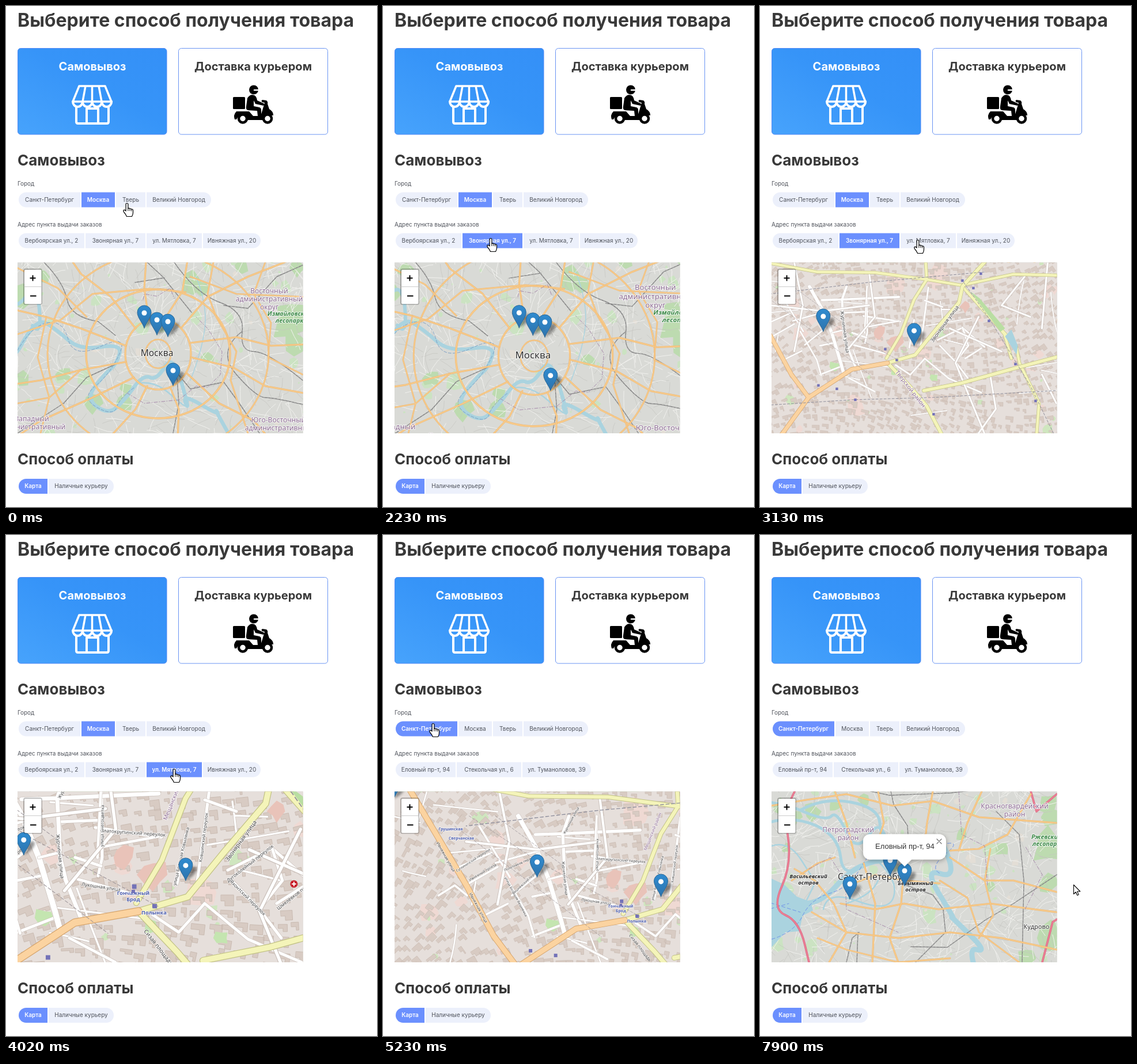
Recreate the animation shown at these times as an HTML page. Size 644 by 870 pixels, loop 8000 ms.

```html
<!DOCTYPE html>
<html lang="ru">
<head>
<meta charset="utf-8">
<title>Способ получения товара</title>
<style>
html,body{margin:0;width:100%;height:100%;overflow:hidden;background:#fff}
svg{display:block;width:644px;height:870px;font-family:Inter,sans-serif}
.head{font-weight:700;fill:#393939}
.small{font-size:10px;fill:#50545c}
.map text{font-family:"Noto Sans","Open Sans",sans-serif;text-anchor:middle;paint-order:stroke;stroke:#fff;stroke-opacity:.75;stroke-width:2px;stroke-linejoin:round}
.flat path{vector-effect:non-scaling-stroke}
path{stroke-linecap:round;stroke-linejoin:round}
</style>
</head>
<body>
<svg id="stage" viewBox="0 0 644 870" xmlns="http://www.w3.org/2000/svg"></svg>
<script>
const $ = id => document.getElementById(id);
let seed = 7;
const rnd = (a = 0, b = 1) => {
  seed = (seed * 16807) % 2147483647;
  return a + (b - a) * seed / 2147483647;
};
const n1 = v => v.toFixed(1);
const line = (d, color, w, more = '') => `<path d="${d}" fill="none" stroke="${color}" stroke-width="${w}" ${more}/>`;
const area = (d, color, more = '') => `<path d="${d}" fill="${color}" ${more}/>`;
const road = (d, color, edge, w) => line(d, edge, w + 1.4) + line(d, color, w);
const text = (x, y, s, size, more = '') => `<text x="${x}" y="${y}" font-size="${size}" ${more}>${s}</text>`;
const group = (inner, more = '') => `<g ${more}>${inner}</g>`;

// ---------- generated map texture ----------
const BOX = [-240, 780, 290, 900];

function mesh(count, min, max) {
  let d = '';
  for (let i = 0; i < count; i++) {
    let x = rnd(BOX[0], BOX[1]), y = rnd(BOX[2], BOX[3]), a = rnd(0, 6.28);
    d += `M${n1(x)} ${n1(y)}`;
    for (let k = 0; k < 3; k++) {
      const l = rnd(min, max);
      a += rnd(-.35, .35);
      x += Math.cos(a) * l;
      y += Math.sin(a) * l;
      d += `L${n1(x)} ${n1(y)}`;
    }
  }
  return d;
}

function blob(x, y, r) {
  let d = '';
  for (let i = 0; i < 8; i++) {
    const q = r * rnd(.55, 1.15), a = i * Math.PI / 4;
    d += `${i ? 'L' : 'M'}${n1(x + q * Math.cos(a))} ${n1(y + q * Math.sin(a))}`;
  }
  return d + 'Z';
}

function blobs(count, min, max, [x0, x1, y0, y1] = BOX) {
  let d = '';
  for (let i = 0; i < count; i++) d += blob(rnd(x0, x1), rnd(y0, y1), min + (max - min) * rnd() ** 3);
  return d;
}

const ground = parks =>
  '<rect x="-900" y="-500" width="2400" height="2200" fill="#d9dad6"/>' +
  area(blobs(230, 2, 17), '#cbe3c2') + area(blobs(70, 3, 12), '#e3ded6') +
  area(parks.map(p => blob(...p)).join(''), '#bddbb0') +
  line(mesh(750, 6, 16), '#c4c5c1', .7) + line(mesh(1150, 6, 18), '#f1f1ee', 1);

const water = (d, w) => line(d, '#aad3df', w);
const main = (d, w = 1.7) => road(d, '#f9cd8c', '#edb877', w);
const rail = d => line(d, '#7d7d7d', 1.4) + line(d, '#c9c9c9', .5, 'stroke-dasharray="3 3"');

// ---------- labels ----------
const PURPLE = 'fill="#8c6a93"', FOREST = 'fill="#3d8a4a" font-style="italic" font-weight="600"';
const label = (x, y, s, size = 12, more = PURPLE) =>
  s.split('|').map((row, i) => text(x, y + i * size * 1.18, row, size, more)).join('');
const street = (x, y, a, s, size = 8.4, more = 'fill="#444"') =>
  text(x, y, s, size, `${more} transform="rotate(${a} ${x} ${y})" dy="${size * .35}"`);
const METRO = 'fill="#4d5fb0" font-weight="700"';

// ---------- city overviews ----------
function moscow() {
  const ring = (rx, ry) => `M${264 - rx} 604a${rx} ${ry} 0 1 0 ${2 * rx} 0a${rx} ${ry} 0 1 0 ${-2 * rx} 0Z`;
  return ground([[495, 545, 38], [500, 585, 26], [325, 480, 24], [338, 492, 14], [150, 690, 18], [205, 690, 17], [30, 505, 22], [60, 470, 16], [30, 650, 16], [100, 640, 14], [505, 455, 15], [410, 450, 14], [350, 610, 13], [210, 665, 12]]) +
    water('M-90 590Q0 640 26 590T70 551 108 580 165 592 197 604 182 630 155 660 158 696 192 697 222 662 250 645 276 626 305 655 312 690 338 692 366 704 386 742 430 800', 6.5) +
    water('M-60 520Q10 535 32 508T58 528 46 555', 6) + water('M230 655Q258 650 285 674T314 696', 2.5) + water('M330 470Q350 520 345 560T320 650', 1.5) +
    line('M20 598Q45 555 72 550T108 579 165 591 197 604 155 660 158 697 192 697 222 663', '#7d9fc4', 1, 'stroke-dasharray="5 3"') +
    rail('M66 445Q100 480 106 510T160 548L190 572') + rail('M245 445L272 470 322 532M224 480L275 472') +
    rail('M292 445Q330 500 372 515T410 565 430 600 515 650') + rail('M291 630L320 665 378 653 405 690 440 742') +
    rail('M20 742L100 690 140 645 190 622') + rail('M378 520L420 525 470 470 515 450') + rail('M296 632L300 690 290 742') + rail('M410 565Q365 600 400 640T450 680 515 692') +
    main(ring(57, 62), 1.8) + main(ring(125, 112), 2) + main(ring(22, 25), 1.1) + main(ring(192, 176), 1.4) +
    main('M225 560L182 505 130 465 85 400M248 545L240 490 246 400M275 544L306 496 322 400M305 558L350 505 420 470 560 415') +
    main('M320 585L400 575 460 590 560 586M321 610L395 628 450 660 560 680M314 638L370 690 430 720 500 800M285 662L300 700 296 800') +
    main('M245 660L225 700 170 760M222 645L150 680 60 720-30 780M208 618L130 632 60 650-40 665M208 590L130 560 70 540-40 515') +
    main('M205 495L250 491 312 497M20 455L90 490 140 540M360 445L350 500 365 540 400 600 390 650 420 742M20 570L95 545 150 500 205 495', 1.4) +
    main('M450 445L430 500 460 550 455 610 515 640M20 690L75 680 130 632M60 742L75 680 55 610 70 540M320 470L400 500 515 505', 1.2) +
    line('M238 510L240 500 262 504 285 490 292 508M210 672L240 690 300 684 330 660 350 662 372 640 375 600 350 560 330 540', '#a88cac', 1, 'stroke-dasharray="6 3 1 3"') +
    label(457, 499, 'Восточный|административный|округ') + label(492, 538, 'Измайловский|лесопарк', 10.5, FOREST) +
    label(262, 608, 'Москва', 15.5, 'fill="#2c2c2c"') +
    label(45, 721, 'Западный|административный') + label(473, 723, 'Юго-Восточный|административный');
}

function petersburg() {
  return ground([[500, 540, 32], [510, 490, 22], [500, 465, 18], [505, 700, 30], [90, 480, 18], [60, 490, 15], [35, 470, 16], [130, 470, 12], [45, 545, 10], [420, 545, 14], [350, 520, 12], [180, 460, 13], [400, 610, 10], [500, 605, 18], [460, 735, 18]]) +
    area('M-250 560L10 592 42 607 64 628 88 637 92 652 74 661 68 688 44 690 20 716-250 800Z', '#aad3df') +
    water('M75 640Q105 640 130 612T176 575 206 566 226 545 270 548 304 539 324 552 313 588 312 625 334 665 362 692 376 720 388 790', 9) +
    water('M-40 465Q25 458 70 478T124 488 150 516 190 520 222 546M20 498Q60 488 98 505T140 560 178 574M70 478Q110 455 158 464T208 500 222 545', 5) +
    water('M20 540Q50 530 72 565T96 600 80 636M206 568Q240 600 232 628T170 636 110 650M205 600Q195 625 150 640', 2.5) +
    line('M20 702Q60 690 74 661T122 622 176 576 224 547 304 540 324 552 313 588', '#6f93e8', 1, 'stroke-dasharray="6 4"') +
    line('M-20 660L50 640M-10 630L70 655', '#6f93e8', 1, 'stroke-dasharray="6 4"') +
    rail('M224 430L232 468 256 505 258 542') + rail('M166 800L170 690M150 742L160 700 172 690') + rail('M248 606L300 625 318 650 322 690 270 742') +
    rail('M262 715L325 716 392 668 440 640 560 560') + rail('M410 480L450 520 458 600 455 742') + rail('M192 445L225 452 330 448 400 440') +
    road('M70 430Q40 470 48 520T38 610 44 660 78 712 96 790M560 640L508 672 490 742 470 800M515 450L480 480 470 445', '#ec7f95', '#d96581', 2.2) +
    main('M20 470L80 460 150 450 230 470 300 462 380 490 515 500M130 445L150 500 165 560M205 445L215 500 200 545') +
    main('M150 610L200 590 250 600 312 605M140 640L200 650 250 640 310 650 400 640 515 655M180 570L200 640 195 742') +
    main('M250 575L245 640 225 700 240 742M120 742L150 690 128 640 95 600 60 580M90 655L150 690 240 700 330 690 420 700 515 720') +
    main('M330 548L380 545 430 520 470 450M330 560L390 600 440 600 515 620M300 445L290 500 285 545M385 445L360 500 345 548') +
    main('M312 600L360 630 380 690 450 742M400 545L390 600 405 660 380 700M55 600L100 570 130 560M100 700L150 720 240 742 330 735', 1.4) +
    line('M345 445L350 520 390 540 395 610M85 580L122 560 148 600 150 650 240 690M460 650L490 590 460 540', '#a88cac', 1, 'stroke-dasharray="6 3 1 3"') +
    label(153, 516, 'Петроградский|район') + label(442, 475, 'Красногвардейский|район') +
    label(84, 596, 'Васильевский|остров', 9.5, 'fill="#222" font-style="italic" font-weight="600"') +
    label(270, 608, 'Безымянный|остров', 9.5, 'fill="#222" font-style="italic" font-weight="600"') +
    label(497, 528, 'Ржевский|лесопарк', 10.5, FOREST) + label(480, 684, 'Кудрово', 11, 'fill="#333"') +
    text(135, 599, 'Санкт-Петербу', 15.5, 'fill="#2c2c2c" style="text-anchor:start"');
}

function tver() {
  return ground([[120, 500, 35], [420, 690, 40], [70, 680, 30], [470, 490, 28], [200, 470, 20]]) +
    water('M-250 590Q40 520 150 565T300 575 400 540 780 580', 12) + water('M290 445Q310 510 286 572', 4) +
    rail('M20 742L180 680 300 665 515 700M180 680L120 742') +
    main('M-100 650L120 610 270 600 400 585 650 640M270 420L262 560 275 680 330 800M130 440L190 560 185 650M400 430L380 560 410 742') +
    main('M20 510L150 530 270 525 400 490 515 470M60 742L130 660 185 650 275 680 400 660 515 610', 1.4) +
    label(267, 593, 'Тверь', 15.5, 'fill="#2c2c2c"');
}

// ---------- central Moscow, close up ----------
function blocks() {
  let d = '';
  for (let x = -650; x < 1350; x += 25) for (let y = 50; y < 1150; y += 24) {
    const a = .5 * Math.sin(x / 210) + .4 * Math.cos(y / 160) - .2;
    const w = rnd(8, 24), h = rnd(7, 20), px = x + rnd(-5, 5), py = y + rnd(-5, 5);
    if (rnd() < .12) continue;
    const c = Math.cos(a), s = Math.sin(a), notch = rnd(.3, .75);
    d += `M${n1(px)} ${n1(py)}l${n1(w * c)} ${n1(w * s)}l${n1(-h * s)} ${n1(h * c)}l${n1(-w * notch * c)} ${n1(-w * notch * s)}l${n1(h * .45 * s)} ${n1(-h * .45 * c)}l${n1(-w * (1 - notch) * c)} ${n1(-w * (1 - notch) * s)}z`;
  }
  return d;
}

function lanes() {
  let d = '';
  for (let i = 0; i < 90; i++) {
    const x = rnd(-600, 1300), y = rnd(60, 1130), l = rnd(50, 160), a = rnd() < .5 ? rnd(-.2, .3) : rnd(1.2, 1.9);
    d += `M${n1(x)} ${n1(y)}q${n1(l * .5 * Math.cos(a) + rnd(-8, 8))} ${n1(l * .5 * Math.sin(a))} ${n1(l * Math.cos(a))} ${n1(l * Math.sin(a))}`;
  }
  return d;
}

const WIDE = 'transform="translate(-166 -452) scale(1.783)"';
const WEST = 'transform="translate(-211.6 4.8) scale(.926)"';

function closeUp() {
  const all = [-650, 1350, 50, 1150];
  const white = (d, w) => road(d, '#fff', '#cbc1bb', w);
  const yellow = (d, w) => road(d, '#f4f4b9', '#c2c286', w);
  const orange = (d, w) => road(d, '#fbd3a0', '#d6a56d', w);
  const stations = [[218, 596], [238, 615], [102, 659], [134, 665], [166, 684], [302, 709], [352, 477], [384, 465], [371, 490], [398, 547], [444, 622], [479, 686]];
  const squares = stations.map(([x, y]) => `<rect x="${x - 2.2}" y="${y - 2.2}" width="4.4" height="4.4" fill="#7372b8"/>`).join('');
  return '<rect x="-3000" y="-2500" width="6500" height="6000" fill="#e6dfdb"/>' +
    area(blobs(90, 14, 45, all), '#efd9d3') + area(blobs(130, 5, 24, all), '#cfe6bf') +
    area(blocks(), '#d8cbc3', 'stroke="#c4b5ab" stroke-width=".8"') +
    area(blob(255, 590, 28) + blob(205, 560, 22) + blob(470, 480, 18), '#e9c3b9') + area(blob(68, 665, 20) + blob(250, 680, 12) + blob(375, 700, 14), '#c4e5b0') +
    white(lanes(), 3.2) +
    white('M155 508L270 525M125 598L222 624M95 498L168 495M166 420L167 560 160 592M356 420L343 520 332 602M312 520L297 606M385 582L462 544 530 604M392 600L440 650 478 700', 5) +
    white('M345 640L420 702 520 745M470 640L520 608M440 650L480 600 462 544M120 560L165 575M255 660L300 690 345 640M20 600L60 592M20 690L84 665M110 700L190 742M400 480L345 460', 5) +
    white('M-12 417L27 486 57 560 85 653 95 690', 10) + white('M27 459L89 457 103 417M89 457L265 449M89 457L94 560 104 600 132 670', 7) +
    group(white('M160 560L268 530M60 575L150 535M95 610L165 570M185 595L240 690 255 742M120 470L195 595M200 640L268 585M20 640L60 615 90 640M130 690L190 660M290 600L330 590M400 600L408 445M408 580L515 560', 5), WEST) +
    group(white('M60 445L75 520 60 600M380 540L340 620 390 742M330 560L420 600M20 520L110 530 190 520M190 463L200 540 150 600M460 470L420 520 470 540M500 445L490 560M400 640L410 700 380 742M490 640L515 690', 3), WIDE) +
    group(
      yellow('M-90 420L20 447 100 462 200 463 290 475 350 485 390 530 445 590 451 620 485 690 478 780 470 900M372 506L425 570 437 612M288 440L290 475 268 510 245 570 220 612M350 485L440 466 600 470M342 739', 4.5) +
      yellow('M222 620L270 606 305 563 346 515 352 487 395 440M224 622L260 660 290 695 315 742 330 800M285 668L350 655 440 630 515 610 650 590', 5.5) +
      orange('M-60 440L20 575 55 640 85 680 160 631 222 620M85 680L40 742-10 800', 6.5) +
      area('M426 574L437 562 448 590 446 606Z', '#aad3df') + area('M366 496L382 508 426 560 418 566Z', '#b9dea2') +
      line('M20 693L160 684 300 680 515 668M390 462L190 480 20 500M510 742L470 660 400 545 352 477', '#8f8f9c', 1, 'stroke-dasharray="4 3"') + squares, WIDE) +
    group(line('M95 445L270 560 515 692M60 470L240 605 420 742M160 445L330 570', '#9b9398', 1.1, 'stroke-dasharray="6 4"'), WEST) +
    group(group(
      street(148, 566, 82, 'Журчинная улица') + street(321, 552, -54, 'Звонярная улица', 9) +
      street(262, 665, 52, 'Тверской район', 10, PURPLE), WIDE), 'id="far"') +
    group(
      street(94, 558, 84, 'Журчинная улица', 8.8) + street(167, 505, -89, 'улица Снегоцветка', 7.8) +
      street(221, 517, 4, 'Златокрупинский переулок') + street(304, 558, -77, 'улица Большая Ковылянка', 7.8) +
      street(343, 525, -83, 'Ковшинский переулок', 7.8) + street(408, 531, -54, 'Звонярная улица', 10) +
      street(424, 570, -38, 'Дугоколейный переулок') + street(420, 630, 45, 'Яхонтский переулок') +
      street(506, 622, -38, 'Шмелёвков переулок') + street(165, 611, 8, 'Лукошная улица') +
      street(265, 716, 52, 'Сизая площадь', 10) + street(293, 452, -68, 'Мещанский район', 10, PURPLE) +
      label(221, 625, 'Гончажный|Брод', 9.2, METRO) + label(257, 659, 'Полынка', 9.2, METRO) +
      '<circle cx="500" cy="606" r="6.5" fill="#c8202c"/>' + line('M497 606h6M500 603v6', '#fff', 2) +
      '<path d="M218 616h6v6h-6zM254 641h6v6h-6z" fill="#7372b8"/>' +
      group(
        street(118, 670, 61, 'Ивняжная улица', 10) + street(38, 545, 60, 'Ивняжная улица', 10) +
        street(105, 553, -33, 'Суглиничский переулок') + street(128, 583, -31, 'Ивняжный проезд') +
        street(210, 643, 62, 'улица Большая Вешняжка') + street(222, 560, -24, 'Полотняков переулок') +
        street(236, 604, -43, 'Вешняжский переулок') + street(345, 456, -62, 'Журчинная улица') +
        label(50, 480, 'Грушинская', 9.2, METRO) + label(76, 503, 'Сверчанская', 9.2, METRO), WEST), 'id="near"');
}

// ---------- page furniture ----------
const shop = group(
  line('M127 139h45l11 27h-67zM138 139l-5 27M149.500 139v27M161 139l5 27', '#fff', 3.5) +
  line('M116 166a8.400 9 0 0 0 16.800 0a8.400 9 0 0 0 16.800 0a8.400 9 0 0 0 16.800 0a8.400 9 0 0 0 16.800 0', '#fff', 4) +
  line('M122 176v25q0 3 3 3h50q3 0 3-3v-25M140 203v-25h20v25', '#fff', 4));

const courier = group(
  '<rect x="394" y="158" width="21" height="21" rx="1.500"/><circle cx="430" cy="145.500" r="8"/>' +
  line('M431 146h7', '#fff', 2.500) +
  area('M419 160q5-8 12-5 4 2 5 9l11 5q3 2 0 4l-14-3-3-6v10l10 2q3 1 3 5v10h-6l-1-9-16-1q-4-1-3-7z', '#000') +
  area('M396 183h26l7 8h13q4-13 7-23l-4-1q-3-2 0-4l7 1q3 2 2 6l3 9q7 4 7 11h-9q-7 2-8 8h-28q-3-8-9-8-7 0-10 7h-3q-3-8 3-14z', '#000') +
  [411, 454].map(x => `<circle cx="${x}" cy="195.500" r="7" fill="#fff" stroke="#000" stroke-width="4.500"/>`).join(''));

const control = '<rect x="30" y="456" width="33" height="63" rx="4" fill="#000" opacity=".25"/><rect x="32" y="458" width="29.500" height="59.500" rx="2" fill="#fff"/>' +
  line('M32 487.500h29.500', '#ccc', 1) + line('M41.500 472.500h10M46.500 467.500v10M42 503.500h10.500', '#000', 2, 'style="stroke-linecap:butt"');

function popup(id, x, y, w, tip, s) {
  return group(`<g filter="url(#soft)"><rect x="${x}" y="${y}" width="${w}" height="44" rx="12" fill="#fff"/><path d="M${tip - 13} ${y + 43}h26l-13 13z" fill="#fff"/></g>` +
    text(x + 21, y + 25.5, s, 13, 'fill="#333" font-family="Liberation Sans,sans-serif"') +
    line(`M${x + w - 16} ${y + 8.5}l8 8m0-8l-8 8`, '#757575', 1.3), `id="${id}" opacity="0"`);
}

$('stage').innerHTML = `<defs>
<clipPath id="frame"><rect x="20" y="445.500" width="495.500" height="296.500"/></clipPath>
<linearGradient id="card" x1="0" y1="1" x2="1" y2="0"><stop stop-color="#47a3fc"/><stop offset=".55" stop-color="#3694f8"/><stop offset="1" stop-color="#3490f7"/></linearGradient>
<linearGradient id="blue" x1="0" y1="0" x2="0" y2="1"><stop stop-color="#2f8bd0"/><stop offset="1" stop-color="#2e74ad"/></linearGradient>
<filter id="soft" x="-20%" y="-30%" width="140%" height="180%"><feDropShadow dx="0" dy="2" stdDeviation="4" flood-opacity=".35"/></filter>
<filter id="blur" x="-50%" y="-50%" width="200%" height="200%"><feGaussianBlur stdDeviation="2"/></filter>
<g id="pin"><path d="M0 0L9-22Q20-27 19-18Q16-8 0 0" opacity=".4" filter="url(#blur)"/>
<path d="M0 0C-3-9-12-18-12-27A12 12 0 0 1 12-27C12-18 3-9 0 0Z" fill="url(#blue)" stroke="#2a6795"/><circle cy="-26" r="4.500" fill="#fff"/></g></defs>
<rect width="644" height="870" fill="#fff"/>` +
  group(text(20, 36, 'Выберите способ получения товара', 32) + text(20, 277, 'Самовывоз', 26) + text(20, 796, 'Способ оплаты', 26), 'class="head"') +
  '<rect x="20.500" y="73.500" width="258.500" height="149.500" rx="5" fill="url(#card)" stroke="#5089f5"/><rect x="299.500" y="73.500" width="259" height="149.500" rx="5" fill="#fff" stroke="#6a94f3"/>' +
  text(150, 112, 'Самовывоз', 20, 'text-anchor="middle" font-weight="700" fill="#fff"') +
  text(429, 112, 'Доставка курьером', 20, 'text-anchor="middle" class="head"') + shop + courier +
  text(20, 312, 'Город', 10, 'class="small"') + text(20, 383, 'Адрес пункта выдачи заказов', 10, 'class="small"') +
  '<g id="city"></g><g id="addr"></g><g id="pay"></g>' +
  group('<rect x="20" y="445" width="496" height="298" fill="#ddd"/>' +
    group(group(moscow(), 'class="flat"') + group(closeUp(), 'id="close" transform="translate(281 574) scale(.06757) translate(-312 -600)"'), 'id="m"') +
    group(tver(), 'id="t" class="flat"') + group(petersburg(), 'id="s" class="flat"'), 'class="map" clip-path="url(#frame)"') +
  group('<g id="pins"></g>' + control, 'clip-path="url(#frame)"') +
  popup('popA', 73, 542, 166, 156, 'ул. Туманоловов, 39') + popup('popB', 179, 519.5, 144, 251, 'Еловный пр-т, 94') +
  group(area('M-1.900 2.500Q-1.900.500 0 .500T1.900 2.500V9.500Q4 8.300 5 10 7 9.200 7.800 11 10.500 10.500 10.500 13V17Q10.500 20 8.500 23.500H-.500Q-2 19.500-5 16.500-7 13.500-5.500 12.300-3.800 11.300-1.900 14Z', '#fff', 'stroke="#000" stroke-width="1.200"') +
    line('M1.900 9.500v4M5 10.500v3M7.800 11.500v2.500', '#000', 1), 'id="hand"') +
  group(area('M.500.500V16.500L4.200 13 6.800 18.700 9.200 17.600 6.700 12H11.800Z', '#fff', 'stroke="#000" stroke-width="1.100"'), 'id="arrow"');

// ---------- state ----------
const CITIES = [['Санкт-Петербург', 22, 107], ['Москва', 131, 58], ['Тверь', 191, 51], ['Великий Новгород', 244, 112]];
const POINTS = {
  m: [['Вербоярская ул., 2', 22, 114], ['Звонярная ул., 7', 138, 104], ['ул. Мятловка, 7', 244, 96], ['Ивняжная ул., 20', 342, 100]],
  t: [['Липнячная ул., 5', 22, 104], ['ул. Сосноярка, 12', 128, 106]],
  s: [['Еловный пр-т, 94', 22, 104], ['Стекольчая ул., 6', 128, 112], ['ул. Туманоловов, 39', 242, 119]]
};
const PINS = {
  m: [[240, 559], [262, 571], [281, 574], [290, 659]],
  t: [[240, 585], [300, 610]],
  s: [[226, 591], [251, 609], [156, 632]]
};

function pills(id, items, y, active) {
  const key = items[0][0] + active, box = $(id);
  if (box.dataset.key === key) return;
  box.dataset.key = key;
  box.innerHTML = items.map(([s, x, w], i) => {
    const on = i === active, l = i ? 0 : 13, r = i === items.length - 1 ? 13 : 0;
    return area(`M${x + l} ${y}h${w - l - r}a${r} 13 0 0 1 ${r} 13a${r} 13 0 0 1 ${-r} 13h${-(w - l - r)}a${l} 13 0 0 1 ${-l}-13a${l} 13 0 0 1 ${l}-13z`, on ? '#6b90fe' : '#ecf0fb') +
      text(x + w / 2, y + 16, s, 10, `text-anchor="middle" fill="${on ? '#fff' : '#50545c'}" ${on ? 'font-weight="600"' : ''}`);
  }).join('');
}

// moments at which the picture advances
const TICKS = [0, 150, 300, 450, 570, 690, 810, 960, 1110, 1250, 1380, 1500, 1650, 1800, 1920, 2230, 2380, 2500, 2650, 2770, 2890, 3010, 3130, 3250, 3390, 3510, 3630, 3750, 4020, 4140, 4290, 4410, 4530, 4670, 4790, 5080, 5230, 5350, 5470, 5590, 5710, 5830, 5980, 6280, 6400, 6550, 6670, 6790, 6940, 7240, 7360, 7480, 7600, 7750, 7900];

// time, kind, then values
const CAMERA = [
  [0, 'm', 267.5, 594, 0], [150, 'm', 267.5, 594, 0], [300, 'm', 265, 590, -.35], [450, 'm', 250, 580, -1],
  [570, 't', 267.5, 594, -.9], [810, 't', 267.5, 594, 0], [1110, 't', 267.5, 594, 0], [1250, 't', 267.5, 594, -.6],
  [1380, 'm', 267.5, 594, -.7], [1500, 'm', 267.5, 594, 0], [1920, 'm', 267.5, 594, 0],
  [2230, 'm', 268.6, 591.4, .124], [2500, 'm', 272, 584, .8], [2890, 'm', 280, 576, 2.3], [3130, 'm', 281, 574.5, 3.053],
  [3390, 'm', 281, 574, 3.6], [3750, 'm', 281, 574, 4], [4020, 'm', 278, 573.6, 3.887], [4290, 'm', 266, 571.5, 3.86],
  [4530, 'm', 262.3, 571.1, 4], [4790, 'm', 262, 571, 4], [5080, 'm', 262, 571, 4], [5230, 'm', 262, 571, 3.5],
  [5350, 'm', 262, 575, 1.6], [5470, 'm', 262, 580, -.8], [5590, 's', 267.5, 594, -.9], [5710, 's', 267.5, 594, -.3], [5830, 's', 267.5, 594, 0]
];
const CURSOR = [
  [0, 'hand', 210, 342], [150, 'hand', 211, 342], [570, 'hand', 211, 342], [810, 'hand', 166, 336], [960, 'hand', 168, 336],
  [1500, 'hand', 168, 336], [1650, 'arrow', 175, 386], [1800, 'hand', 182, 395], [1920, 'hand', 187, 403], [2500, 'hand', 187, 403],
  [2650, 'hand', 196, 403], [3130, 'hand', 274, 406], [3390, 'hand', 284, 406], [3750, 'hand', 292, 406], [4140, 'hand', 292, 406],
  [4290, 'hand', 265, 398], [4410, 'arrow', 205, 384], [4530, 'arrow', 168, 377], [4670, 'arrow', 115, 352], [4790, 'hand', 84, 326],
  [5080, 'hand', 87, 327], [5350, 'hand', 87, 327], [5830, 'hand', 162, 604], [5980, 'hand', 164, 604], [6280, 'hand', 164, 604],
  [6400, 'hand', 171, 590], [6790, 'hand', 255, 590], [6940, 'hand', 257, 592], [7240, 'hand', 257, 592], [7600, 'hand', 312, 527],
  [7750, 'hand', 320, 528], [7900, 'arrow', 544, 607]
];

function at(keys, t) {
  const i = keys.findLastIndex(k => k[0] <= t), a = keys[i], b = keys[i + 1];
  if (!b || a[1] !== b[1]) return a.slice(1);
  const f = (t - a[0]) / (b[0] - a[0]);
  return [a[1], ...a.slice(2).map((v, j) => v + (b[j + 2] - v) * f)];
}
const show = (id, on) => $(id).setAttribute('display', on ? 'inline' : 'none');
const fade = (id, v) => { show(id, v > 0); $(id).setAttribute('opacity', v); };
const clamp = v => Math.max(0, Math.min(1, v));

function draw(t) {
  const city = t < 300 ? 'm' : t < 1250 ? 't' : t < 5230 ? 'm' : 's';
  const point = t >= 2230 && t < 4020 ? 1 : t >= 4020 && t < 5230 ? 2 : -1;
  pills('city', CITIES, 323.5, 'smt'.indexOf(city));
  pills('addr', POINTS[city], 394.5, point);
  pills('pay', [['Карта', 22, 50], ['Наличные курьеру', 74, 113]], 821, 0);

  const [scene, cx, cy, z] = at(CAMERA, t), k = 2 ** z;
  for (const id of 'mts') show(id, id === scene);
  $(scene).setAttribute('transform', `translate(267.5 594) scale(${k}) translate(${-cx} ${-cy})`);
  fade('close', clamp((z - 1.4) / .7));
  show('far', z < 3.4);
  show('near', z >= 3.4);
  $('pins').innerHTML = PINS[scene].map(([x, y]) =>
    `<use href="#pin" x="${n1(267.5 + (x - cx) * k)}" y="${n1(594 + (y - cy) * k)}"/>`).join('');

  fade('popA', t < 6280 || t >= 7480 ? 0 : t < 6400 ? .88 : t < 7240 ? 1 : t < 7360 ? .7 : .2);
  fade('popB', t < 7240 ? 0 : t < 7360 ? .35 : t < 7480 ? .85 : 1);

  const [kind, x, y] = at(CURSOR, t);
  show('hand', kind === 'hand');
  show('arrow', kind === 'arrow');
  $(kind).setAttribute('transform', `translate(${n1(x)} ${n1(y)})`);
}

let start, last;
function tick(now) {
  start ??= now;
  const t = (now - start) % 8000, step = TICKS.findLast(v => v <= t);
  if (step !== last) draw(last = step);
  requestAnimationFrame(tick);
}
draw(last = 0);
requestAnimationFrame(tick);
</script>
</body>
</html>
```
